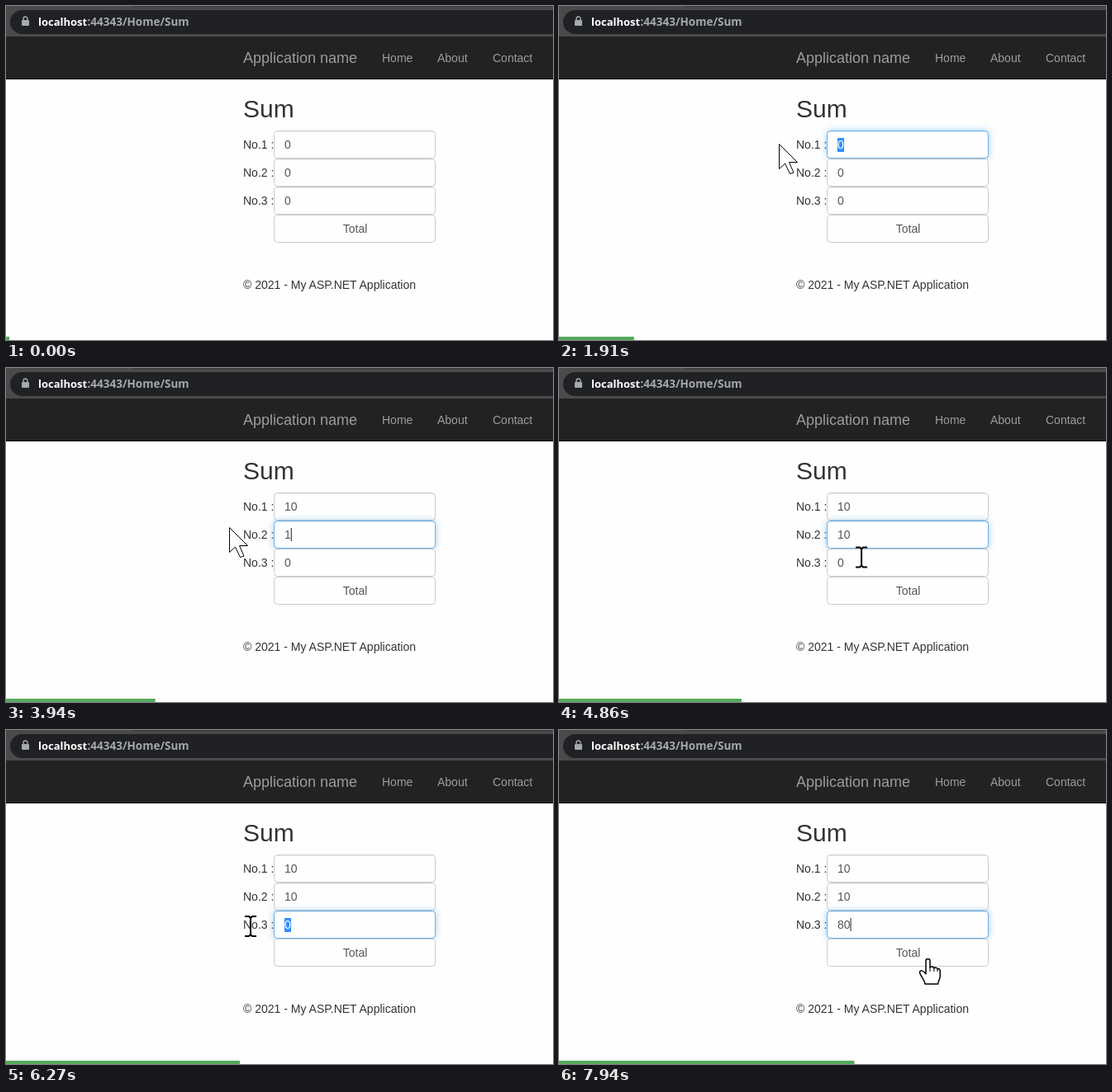
An HTML page that plays this animation: 662x405 px, repeating every 8000 ms.

```html
<!DOCTYPE html>
<html lang="en">
<head>
<meta charset="utf-8">
<title>Sum</title>
<style>
  html, body { margin: 0; width: 100%; height: 100%; overflow: hidden; background: #fefefe; }
  svg { display: block; width: 662px; height: 405px; }
  text { font: 14px "Liberation Sans", Arial, sans-serif; fill: #333; white-space: pre; }
  .url { font: 700 13px "Open Sans", sans-serif; fill: #fff; }
  .url.path { font-size: 13.5px; fill: #a5a8ac; }
  .nav text { fill: #9d9d9d; }
  .nav .brand { font-size: 18px; }
  .title { font-size: 30px; }
  .value { fill: #555; }
  .box { fill: #fefefe; stroke: #ccc; }
  .glow { fill: #fefefe; stroke: #66afe9; filter: drop-shadow(0 0 4px rgba(102, 175, 233, .6)); }
  .cursor path { stroke: #000; fill: #fff; }
</style>
</head>
<body>
<svg viewBox="0 0 662 405">
  <rect width="662" height="405" fill="#fefefe"/>
  <rect width="662" height="38" fill="#4a4a4a"/>
  <rect x="153" width="509" height="1" fill="#383838"/>
  <rect x="5" y="5" width="700" height="29" rx="14.5" fill="#202124"/>
  <rect x="19" y="17" width="9" height="7" rx="1" fill="#a5a8ac"/>
  <path d="M21 17v-1.5a2.5 2.5 0 0 1 5 0V17" fill="none" stroke="#a5a8ac" stroke-width="1.4"/>
  <text class="url" x="39" y="24">localhost</text>
  <text class="url path" x="98.5" y="24">:44343/Home/Sum</text>

  <g class="nav">
    <rect y="37" width="662" height="52" fill="#222"/>
    <rect y="88" width="662" height="1" fill="#080808"/>
    <text class="brand" x="287" y="69">Application name</text>
    <text x="455" y="68">Home</text>
    <text x="522" y="68">About</text>
    <text x="589" y="68">Contact</text>
  </g>

  <text class="title" x="287" y="135">Sum</text>
  <g id="form"></g>
  <rect class="box" x="324.5" y="253.5" width="195" height="33" rx="4"/>
  <text class="value" x="422.5" y="275" text-anchor="middle">Total</text>
  <text x="287" y="343">© 2021 - My ASP.NET Application</text>
  <rect id="bar" y="401" height="4" fill="#54a95c"/>

  <g id="pointer" class="cursor">
    <circle id="halo" cx="-3" cy="-1" r="20.5" fill="#ffee14" opacity=".75"/>
    <path id="arrow" d="M.5 .5V30.5L7.5 24L13.5 36.5L18 35L12.5 22.5H22.5Z"/>
    <path id="beam" d="M-7-12h5l2 2l2-2h5M-7 12h5l2-2l2 2h5M0-10V10" style="fill:none;stroke-width:2"/>
    <g id="hand">
      <path stroke-width="1.5" stroke-linejoin="round" d="M-2.5 3a2.5 2.5 0 0 1 5 0V11c.5-1.5 4.5-1.5 5 .8c.7-1.3 4-.9 4.2 1.2c1-1 3-.3 3 2V22c0 3-2.2 4.5-2.5 9H-3.5C-4 26-10 20-10 16.8c0-2.6 4-3.2 7.5 2z"/>
      <path d="M2.5 11v5M7.3 12v4M11.5 13v3"/>
    </g>
  </g>
</svg>
<script>
const LOOP = 8000, BLINK = 530, FADE = 150;
const $ = id => document.getElementById(id);

// press / blur: focus span; drag: release time; keys: typing times
const fields = [
  { press: 1640, release: 1860, blur: 3050, keys: [2240, 2400], text: "10" },
  { press: 3050, release: 3340, blur: 5200, keys: [3900, 4070], text: "10" },
  { press: 5200, release: 5620, blur: 1e9, keys: [6480, 6650], text: "80" }
];

// time, x, y
const track = [
  [0, 580, 412], [450, 577, 410], [700, 560, 330], [860, 536, 254],
  [1000, 497, 148], [1150, 423, 113], [1300, 400, 125], [1550, 362, 168],
  [1640, 360, 168], [1840, 266, 167], [2650, 266, 167], [2950, 375, 200],
  [3050, 372, 202], [3300, 270, 193], [4400, 270, 193], [4950, 386, 237],
  [5200, 380, 238], [5450, 296, 238], [6350, 296, 238], [6750, 386, 262],
  [6890, 417.5, 266], [7590, 436, 271], [7940, 446.5, 277], [8000, 446.5, 277]
];

fields.forEach((f, i) => {
  const y = 151 + 34 * i;
  const rect = `x="324.5" y="${y + .5}" width="195" height="33" rx="4"`;
  const g = document.createElementNS("http://www.w3.org/2000/svg", "g");
  g.innerHTML = `
    <text x="287" y="${y + 22}">No.${i + 1} :</text>
    <rect class="box" ${rect}/>
    <rect class="glow" ${rect}/>
    <rect x="327" y="${y + 1}" width="190" height="1" opacity=".06"/>
    <rect class="mark" x="337" y="${y + 9}" width="8" height="17" fill="#3390ff"/>
    <text class="value" x="337" y="${y + 22}"></text>
    <rect class="caret" y="${y + 9}" width="1" height="16" fill="#222"/>`;
  $("form").append(g);
  for (const name of ["glow", "mark", "value", "caret"]) f[name] = g.querySelector("." + name);
});

const clamp = v => Math.max(0, Math.min(1, v));
const show = (el, on) => el.setAttribute("visibility", on ? "visible" : "hidden");

function pointAt(t) {
  const i = Math.max(1, track.findIndex(k => k[0] >= t));
  const [t0, x0, y0] = track[i - 1], [t1, x1, y1] = track[i];
  const u = clamp((t - t0) / (t1 - t0));
  return [x0 + (x1 - x0) * u, y0 + (y1 - y0) * u];
}

function drawField(f, t, x) {
  const { press, release, blur, keys } = f;
  const typed = keys.filter(k => t >= k).length;
  const focused = t >= press && t < blur;
  const marked = focused && !typed && (t >= release || x < 341);
  f.glow.setAttribute("opacity", clamp((t - press) / FADE) * (1 - clamp((t - blur) / FADE)));
  f.value.textContent = typed ? f.text.slice(0, typed) : "0";
  f.value.style.fill = marked ? "#fff" : "";
  show(f.mark, marked);
  const since = t - (typed ? keys[typed - 1] : press);
  f.caret.setAttribute("x", 337 + 7.8 * (typed || 1));
  show(f.caret, focused && !marked && since % (2 * BLINK) < BLINK);
}

function drawPointer(t, x, y) {
  const pressed = fields.some(f => t >= f.press && t < f.release);
  const inside = x >= 287 && x < 520;
  const hand = inside && y >= 253 && y < 287;
  const beam = pressed || inside && y >= 151 && y < 253;
  $("pointer").setAttribute("transform", `translate(${x} ${y})`);
  show($("halo"), pressed);
  show($("hand"), hand);
  show($("beam"), beam);
  show($("arrow"), !hand && !beam);
}

function step(t) {
  return t < 925 ? Math.floor((t + 5) / 66.4) : 14 + Math.floor((t - 925) / 70.1);
}

function render(now) {
  const n = step(now % LOOP);
  const t = n < 14 ? n * 66.4 : 930 + (n - 14) * 70.1;
  const [x, y] = pointAt(t);
  $("bar").setAttribute("width", 4 + 3.1 * n);
  fields.forEach(f => drawField(f, t, x));
  drawPointer(t, x, y);
}

const start = performance.now();
function tick() {
  render(performance.now() - start);
  requestAnimationFrame(tick);
}
tick();
</script>
</body>
</html>
```
